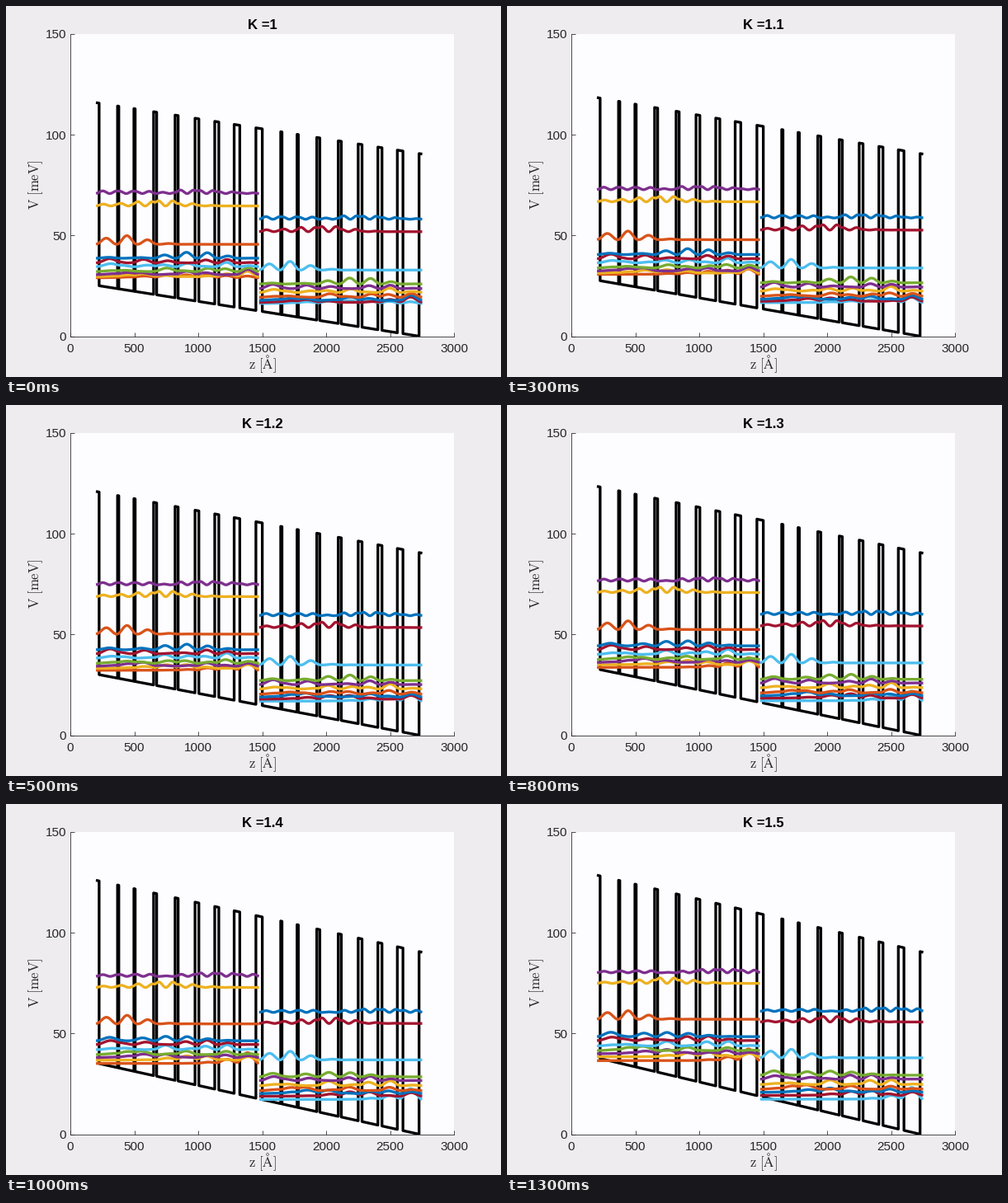
A matplotlib script that plays this animation: 600 px wide and 450 px high, repeating every 1.5 s.

```python
import numpy as np
import matplotlib.pyplot as plt
from matplotlib.animation import FuncAnimation

plt.rcParams["font.family"] = "Liberation Sans"
plt.rcParams["mathtext.fontset"] = "cm"

PX = 0.72                       # points per pixel at 100 dpi
COLORS = ["#0072BD", "#D95319", "#EDB120", "#7E2F8E",
          "#77AC30", "#4DBEEE", "#A2142F"]
INK = "#262626"

# One period in angstroms: barrier, well, barrier, ...
LAYERS = [25, 144, 10, 118, 10, 144, 24, 144, 24, 132, 30,
          124, 32, 120, 44, 126, 25]
PERIOD = sum(LAYERS)
Z0 = 200
Z_MIN = Z0 + 2 * PERIOD - LAYERS[-1]    # lowest point of the potential
BARRIER = 90.6                  # meV
FIELD = 0.01                    # meV per angstrom at K = 1
KINETIC = 3.81e3                # hbar^2 / 2m0, meV * angstrom^2
MASS_WELL, MASS_BARRIER = 0.067, 0.0753
PAD = 25                        # extra barrier on both sides when solving
STATES = 10
SCALE = 800                     # meV per unit of probability density

is_wall = np.repeat(np.arange(len(LAYERS)) % 2 == 0, LAYERS)
padded = np.pad(is_wall, PAD, constant_values=True)
z = np.arange(PERIOD) + 0.5


def solve(k):
    """Energies and densities of the lowest states in the last period."""
    pos = np.arange(len(padded)) + 0.5 - PAD
    v = BARRIER * padded + k * FIELD * (PERIOD - LAYERS[-1] - pos)
    t = KINETIC / np.where(padded, MASS_BARRIER, MASS_WELL)
    t = np.pad(t, 1, mode="edge")
    t = (t[1:] + t[:-1]) / 2
    h = np.diag(v + t[1:] + t[:-1])
    h -= np.diag(t[1:-1], 1) + np.diag(t[1:-1], -1)
    energy, psi = np.linalg.eigh(h)
    return energy[:STATES], psi[PAD:-PAD, :STATES].T ** 2


def profile(k):
    """Outline of the tilted wells over both periods."""
    edges = Z0 + np.cumsum([0] + LAYERS)
    xs, vs = [], []
    for n in range(2):
        for i in range(len(LAYERS)):
            xs += [edges[i] + n * PERIOD, edges[i + 1] + n * PERIOD]
            vs += [BARRIER * (i % 2 == 0)] * 2
    xs = np.array(xs)
    return xs, np.array(vs) + k * FIELD * (Z_MIN - xs)


K_VALUES = [1 + i / 10 for i in range(6)]
solutions = [solve(k) for k in K_VALUES]

fig = plt.figure(figsize=(6, 4.5), dpi=100, facecolor="#eeecef")
ax = fig.add_axes([0.13, 0.11, 0.775, 0.815], facecolor="#fdfcff")
ax.set(xlim=(0, 3000), ylim=(0, 150),
       xticks=range(0, 3001, 500), yticks=range(0, 151, 50))
ax.spines[["top", "right"]].set_visible(False)
ax.spines[["left", "bottom"]].set(color=INK, linewidth=0.8 * PX)
ax.tick_params(direction="in", length=4.65 * PX, width=0.8 * PX, color=INK,
               labelcolor=INK, labelsize=15.2 * PX, pad=5 * PX)
ax.tick_params(axis="x", pad=8.5 * PX)

title = fig.text(310.5 / 600, 1 - 22 / 450, "", ha="center",
                 va="center_baseline", weight="bold", size=16.8 * PX)
label = dict(size=16.7 * PX, color=INK)
fig.text(310.5 / 600, 1 - 440 / 450, r"$\mathrm{z\ [Å]}$",
         ha="center", va="baseline", **label)
fig.text(47 / 600, 1 - 217 / 450, r"$\mathrm{V\ [meV]}$", rotation=90,
         ha="right", va="center", **label)

line = dict(lw=3.3 * PX, solid_capstyle="butt", solid_joinstyle="round")
outline, = ax.plot([], [], color="black", **line)
# Right period first; the colour cycle starts at the sixth entry.
curves = [ax.plot([], [], color=COLORS[(5 + j) % 7], **line)[0]
          for j in range(2 * STATES)]


def update(i):
    step = 2 * i // 5
    k = K_VALUES[step]
    energy, density = solutions[step]
    title.set_text(f"K ={k:g}")
    outline.set_data(*profile(k))
    for j, curve in enumerate(curves):
        left, n = divmod(j, STATES)
        curve.set_data(Z0 + z + (1 - left) * PERIOD,
                       energy[n] + left * k * FIELD * PERIOD
                       + SCALE * density[n])
    return [outline, title, *curves]


anim = FuncAnimation(fig, update, frames=15, interval=100,
                     repeat=True, repeat_delay=0)
plt.show()
```
